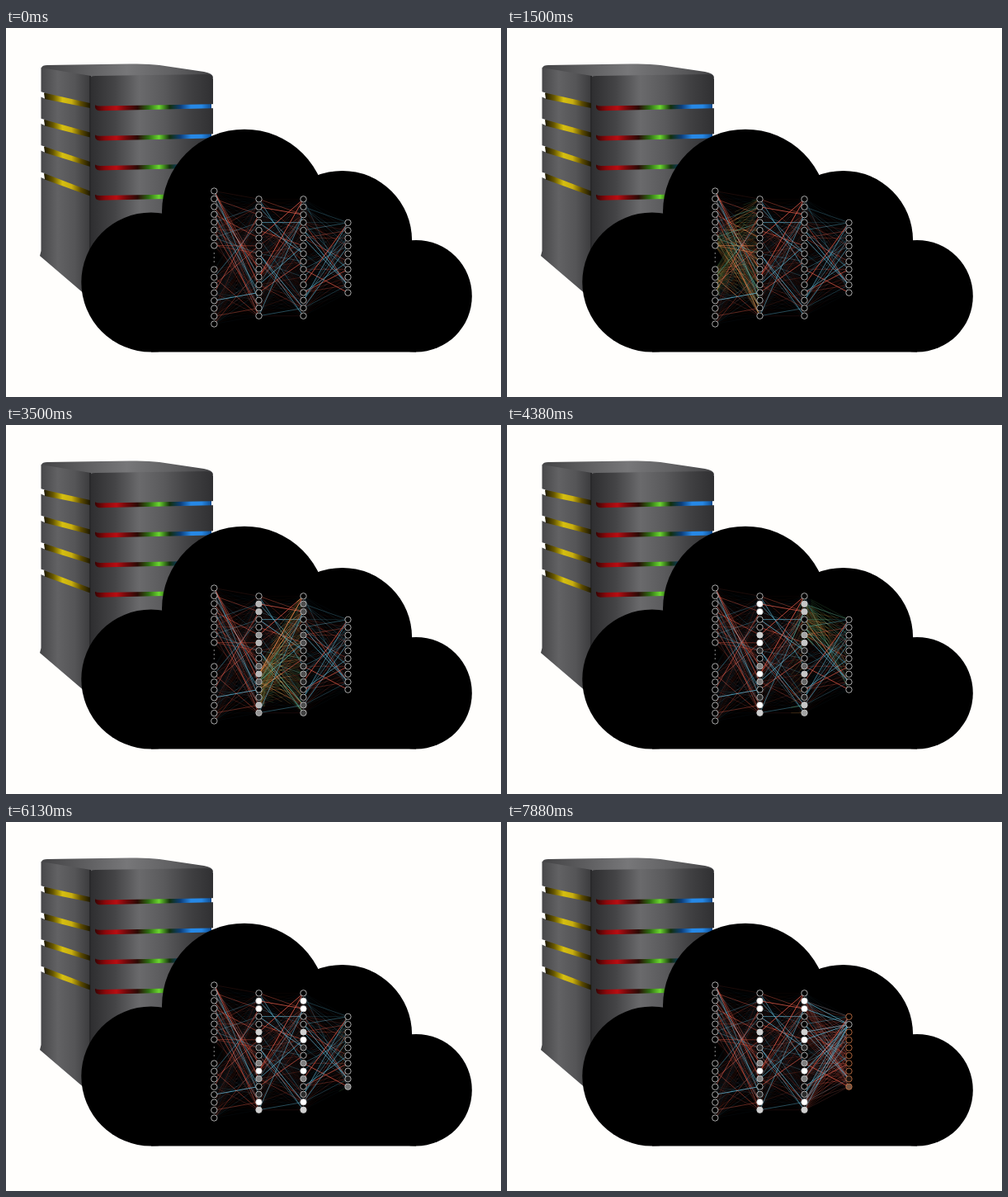
Write an HTML page with a canvas that moves like this. It is 600 by 447 pixels and loops after 8000 ms.

```html
<!DOCTYPE html>
<html>
<head>
<meta charset="utf-8">
<style>
html, body { margin: 0; width: 100%; height: 100%; overflow: hidden; background: #fffefc; }
canvas { display: block; }
</style>
</head>
<body>
<canvas id="stage" width="600" height="447"></canvas>
<script>
const ctx = document.getElementById('stage').getContext('2d');
const LOOP = 8000, STEP = 125, WINNER = 1;
const RED = '#f4624f', BLUE = '#67c5e6', GOLD = '#d2b04a', GREEN = '#5aa34c';
const clamp = v => Math.max(0, Math.min(1, v));
const ease = v => { v = clamp(v); return v * v * (3 - 2 * v); };

let seed = 29;
const rand = () => (seed = (seed * 16807) % 2147483647) / 2147483647;

// Network
const column = (x, y, n, act = () => 0) =>
  Array.from({ length: n }, (_, i) => ({ x, y: y + i * 9.43, act: act(i) }));
const wave = i => clamp(0.42 + 0.9 * Math.cos(2 * Math.PI * (i - 1.5) / 4.25));
const layers = [
  [...column(252.3, 197.5, 8), ...column(252.3, 292.5, 8)],
  column(306.5, 207.3, 16, wave),
  column(360.5, 207.3, 16, wave),
  column(414.5, 235.8, 10, i => 0.45 * (i / 9) ** 12)
];

// Most weights are faint, a few stand out
const edges = [];
for (let l = 0; l < 3; l++)
  layers[l].forEach((a, i) => layers[l + 1].forEach((b, j) => {
    const color = rand() < 0.56 ? RED : BLUE;
    edges.push({ l, i, j, a, b, color, size: 0.05 + 0.75 * rand() ** 9 });
  }));

function line(a, b, from, to, color, alpha, width) {
  const at = p => [a.x + (b.x - a.x) * p, a.y + (b.y - a.y) * p];
  ctx.globalAlpha = alpha;
  ctx.strokeStyle = color;
  ctx.lineWidth = width;
  ctx.beginPath();
  ctx.moveTo(...at(from));
  ctx.lineTo(...at(to));
  ctx.stroke();
  ctx.globalAlpha = 1;
}

function drawEdges(t) {
  const decide = ease((t - 6250) / 1100);
  for (const { l, i, j, a, b, color, size } of edges) {
    line(a, b, 0, 1, color, size, 0.6 + size * 0.5);
    if (l === 2 && decide) {
      const won = j === WINNER;
      line(a, b, 0, 1, won ? BLUE : RED, decide * a.act * (won ? 0.75 : 0.2), 0.9);
    }
    // A pulse leaves each source in turn
    const p = (t - 400 - l * 1700 - i * 95) / 1000;
    if (p > 0 && p < 1)
      line(a, b, clamp(p * 2 - 1), clamp(p * 2), color === RED ? GOLD : GREEN, 0.16 + size * 0.45, 0.9);
  }
}

function drawNodes(t) {
  const fade = [0, ease((t - 2400) / 1700), ease((t - 2500) / 2700), ease((t - 4600) / 1500)];
  const decide = ease((t - 6200) / 700);
  layers.forEach((layer, l) => layer.forEach((node, i) => {
    const warm = l === 3 && i !== WINNER ? decide : 0;
    ctx.beginPath();
    ctx.arc(node.x, node.y, 3.7, 0, 7);
    ctx.fillStyle = '#000';
    ctx.fill();
    ctx.fillStyle = `rgba(255,${255 - 65 * warm},${255 - 105 * warm},${node.act * fade[l]})`;
    ctx.fill();
    ctx.strokeStyle = `rgb(200,${200 - 84 * warm},${200 - 130 * warm})`;
    ctx.lineWidth = 0.85;
    ctx.stroke();
  }));
  ctx.fillStyle = '#bbb';
  for (const y of [273, 278, 283]) ctx.fillRect(251.7, y - 0.6, 1.2, 1.2);
}

// Scenery
function gradient(x1, y1, x2, y2, ...colors) {
  const g = ctx.createLinearGradient(x1, y1, x2, y2);
  colors.forEach((c, i) => g.addColorStop(i / (colors.length - 1), c));
  return g;
}

function shape(path, fill) {
  ctx.fillStyle = fill;
  ctx.fill(new Path2D(path));
}

function drawServer() {
  shape('M43 48Q44 45 50 45L150 43.5Q172 43 186 45L240 53Q251 55 251 60L103 61L43 50Z',
    gradient(43, 45, 250, 56, '#444446', '#5d5d5f', '#777779', '#626264', '#444446'));
  shape('M42.5 48L103 58V329L41 276L42.5 270Z',
    gradient(42, 0, 104, 0, '#474749', '#626264', '#555557', '#39393b'));
  shape('M102 62Q102 58 108 58L244 56Q251 56 251 62V275H102Z',
    gradient(102, 0, 251, 0, '#2e2e30', '#444446', '#6a6a6c', '#5a5a5c', '#414143', '#303032'));
  shape('M101 58H103V329L101 327Z', '#29292b');

  for (let i = 0; i < 4; i++) {
    const left = 78.5 + i * 32.5, right = 91 + i * 35.5;
    shape(`M40 ${left - 2}L47 ${left}V${left + 7}L40 ${left + 4}Z`, '#fffefc');
    shape(`M46 ${left}L102 ${right}V${right + 6}L47 ${left + 7.5}Z`,
      gradient(46, 0, 102, 0, '#1d1800', '#685800', '#d6bf10', '#c8ae10', '#5c4b00', '#1d1800'));

    const y = 93.2 + i * 36.2;
    shape(`M249 ${y - 1}H252V${y + 4}H249Z`, '#fffefc');
    shape(`M108 ${y}Q110 ${y + 1.5} 115 ${y + 1.3}L249 ${y - 1}V${y + 4}L113 ${y + 7}Q107 ${y + 6} 108 ${y}Z`,
      gradient(108, 0, 250, 0, '#3a0303', '#8e080b', '#b80d12', '#6b080a', '#2a0a05', '#2c6a12', '#6ad62f',
        '#12300a', '#0c3d78', '#2688e6', '#2688e6', '#0c4688'));
  }
}

function drawCloud() {
  ctx.fillStyle = '#000';
  for (const [x, y, r] of [[175.8, 308, 84.5], [289, 222.7, 100], [407.6, 257.4, 84.5], [497, 324.7, 67.8]]) {
    ctx.beginPath();
    ctx.arc(x, y, r, 0, 7);
    ctx.fill();
  }
  ctx.fillRect(176, 310, 321, 82.5);
  ctx.fillRect(190, 230, 290, 100);
}

function frame(now) {
  const t = Math.floor((now % LOOP) / STEP) * STEP;
  ctx.fillStyle = '#fffefc';
  ctx.fillRect(0, 0, 600, 447);
  drawServer();
  drawCloud();
  drawEdges(t);
  drawNodes(t);
  requestAnimationFrame(frame);
}
frame(performance.now());
</script>
</body>
</html>
```
